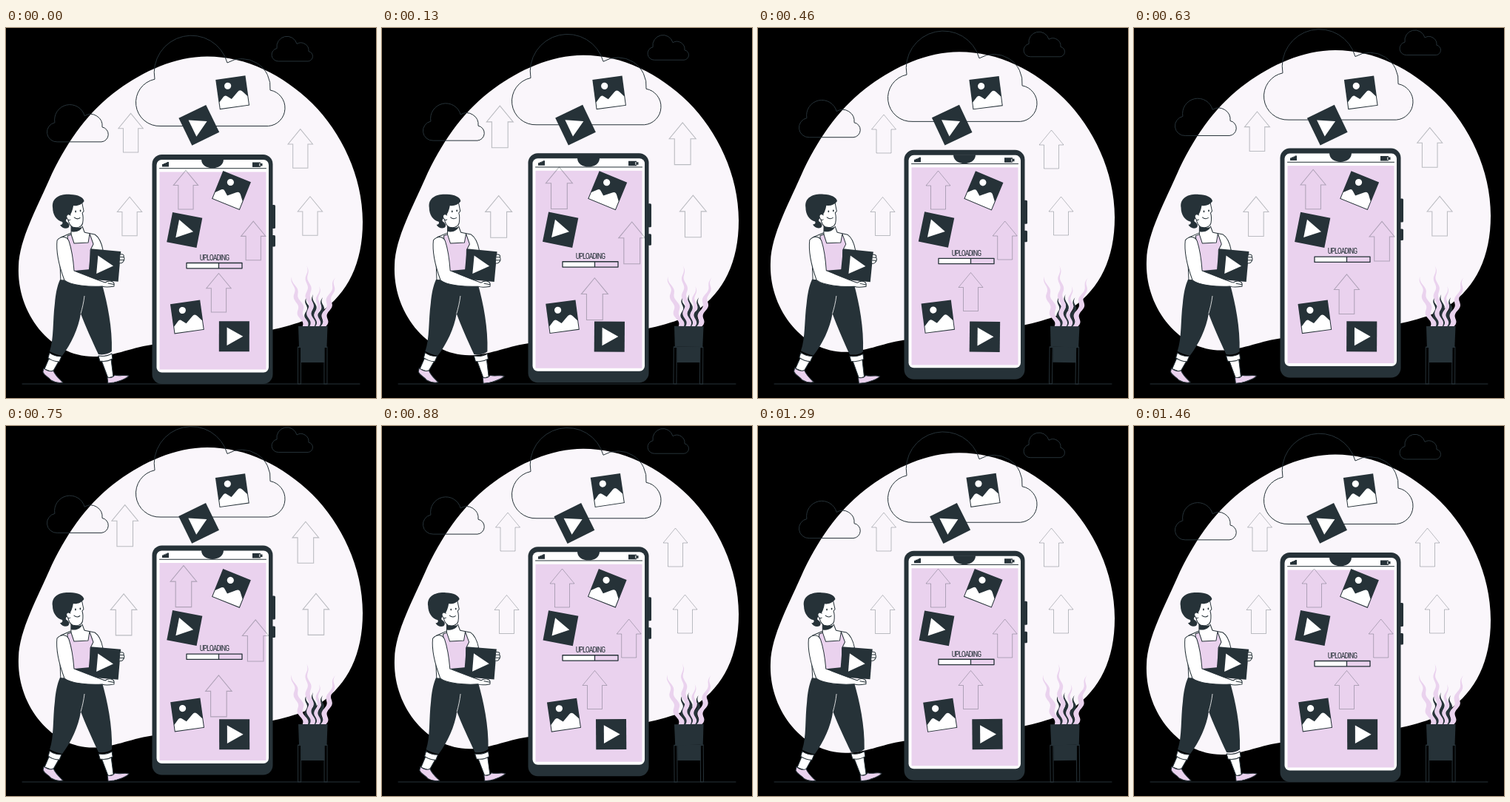
These frames come from a looping animation (500 by 500 pixels, 1500 ms). An HTML page:

```html
<!DOCTYPE html>
<html lang="en">
<head>
<meta charset="utf-8">
<title>Uploading</title>
<style>
  html, body { margin: 0; width: 100%; height: 100%; overflow: hidden; background: #000; }
  svg { display: block; width: 100%; height: 100%; }
  .k { fill: #263238; }
  .w { fill: #fff; }
  .l { fill: #ead2ee; }
  .o { stroke: #263238; stroke-width: 1; stroke-linejoin: round; stroke-linecap: round; }
  .n { fill: none; }
  .cloud { fill: none; stroke: #263238; vector-effect: non-scaling-stroke; }
  #arrows { fill: none; stroke: #263238; stroke-opacity: .3; }
  text {
    font: 10px "Roboto Condensed", "Open Sans Condensed", Roboto, "Noto Sans", sans-serif;
    font-stretch: extra-condensed; letter-spacing: -.9px; text-anchor: middle;
  }
</style>
</head>
<body>
<svg viewBox="0 0 500 500">
  <defs>
    <path id="cloud" class="cloud" d="M209 132.5A32 32 0 0 1 201 69.2A50.3 50.3 0 0 1 299 47A38.5 38.5 0 0 1 357 84A24.5 24.5 0 0 1 354.5 132.5Z"/>
    <path id="arrow" d="M0 0L16.5 20H10V52H-10V20H-16.5Z"/>
    <g id="play">
      <rect class="k" x="-20.5" y="-20.5" width="41" height="41"/>
      <path class="w" d="M-9.8 -12.3L12 0L-9.8 12.3Z"/>
    </g>
    <g id="photo">
      <rect class="k" x="-20.3" y="-20.3" width="40.6" height="40.6"/>
      <circle class="w" cx="-5.2" cy="-9.8" r="4.6"/>
      <path class="w" d="M-19.3 10.5L-13 4Q-10.5 1.5 -8 4L-2.5 8.5L7 0Q10.5 -3.5 14 1L19.3 7.5V19.3H-19.3Z"/>
    </g>
  </defs>

  <path class="o n" d="M22 481H478"/>

  <g id="float">
    <path fill="#faf6fb" d="M17 322C18 285 42 243 62 197C85 150 112 112 152 83C185 59 228 38.5 272 38.5C325 38.5 374 63 414 102C453 141 482 200 482 262C482 318 462 358 425 384C382 413 280 420 197 428C165 433 145 444 118 444C60 444 14 385 17 322Z"/>
    <use href="#cloud"/>
    <use href="#cloud" transform="translate(-16.7 99.4) scale(.411)"/>
    <use href="#cloud" transform="translate(310.8 8.5) scale(.275)"/>

    <rect class="k" x="359" y="239" width="5" height="32" rx="1.5"/>
    <rect class="k" x="359" y="280" width="5" height="15.5" rx="1.5"/>
    <rect class="k" x="197.5" y="171" width="163" height="310" rx="13"/>
    <rect class="w" x="203.5" y="178" width="151.5" height="287.5" rx="7"/>
    <rect class="l" x="207.5" y="194.5" width="144" height="267"/>
    <path class="o n" d="M207.5 189.7H351.5"/>
    <path class="k" d="M264 177.5C264 193.3 294 193.3 294 177.5Z"/>
    <path class="k" d="M211 187.5V184H213V183H215.5V182H217.5V181H220V187.5Z"/>
    <path class="k" d="M333 181.5H344V183H346.5V186.5H344V188H333Z"/>
    <path class="w" d="M342.3 182.8H343.3V186.8H342.3Z"/>
    <rect class="l" x="244" y="317.5" width="75" height="7.3"/>
    <rect class="w" x="244" y="317.5" width="43.5" height="7.3"/>
    <path class="o n" style="stroke-width: 1.3" d="M244 317.5H319V324.8H244ZM287.5 317.5V324.8"/>
    <text class="k" x="281.5" y="313.8">UPLOADING</text>
  </g>

  <g id="arrows"></g>
  <g id="tiles"></g>

  <g id="person">
    <path class="w o" d="M58 447L71 451L63 465L52 461Z"/>
    <path class="w o" d="M129 449L142 447L145 471L138 473Z"/>
    <path class="l o" d="M51 460C55 463 60 465 64 463C67 470 73 475 77 479C72 480 66 479 61 476C57 471 52 470 50 465Z"/>
    <path class="l o" d="M137 472C141 473 145 472 147 469C153 471 161 468 166 470C163 474 156 476 150 478L146 479L138 480Z"/>

    <path class="w o" d="M88 277L105 276L120 279C126 283 129 290 131 300L114 304L113 332L74 342L72 300L74 283Z"/>
    <path class="w" d="M88 262V279L92 290H110L106 276L102 266Z"/>
    <path class="l o" d="M83 281C84 300 87 315 92 329L114 330L114 300L118 292L113 278L111 290L92 291L88 279Z"/>
    <path class="o n" d="M88 264V279M103 268L106 276"/>
    <path class="k" d="M88 267C93 270 99 271 103 268.5C102 273 95 277 88 275Z"/>
    <path class="w o" d="M84 240C82 256 84 266 90 269C96 271 102 269 103.5 264C104.5 258 104 253 103 250L105 247.5C104 243 103 238 102 233Z"/>
    <path class="k" d="M63 243C61 229 74 224 87 225C97 225 105 229 105.5 234C102 239 96 241 91 240C90 246 88 252 84 256C81 258 80 261 82 262C85 264 87 267 84 270C80 272 75 270 73 266C76 266 77 264 76 262C68 260 63 252 63 243Z"/>
    <path class="w o" d="M87 253C83 250 80 254 83 258C84 260 86 260 87 259"/>
    <ellipse class="k" cx="94" cy="248" rx=".9" ry="1.4"/>
    <ellipse class="k" cx="100.5" cy="247" rx=".9" ry="1.4"/>
    <path class="o n" d="M92 256Q96 259.5 100 256.5"/>

    <path class="k" d="M73 340L130 347C137 372 144 405 143 437C138 441 131 442 125 441C117 424 107 402 101 386C98 406 88 427 76 443C70 442 64 440 59 437C65 420 63 395 66 372C67 360 69 349 73 340Z"/>
    <path class="n" stroke="#fff" stroke-width=".8" d="M106 362C105 371 103 379 101 386"/>
    <path class="w o" d="M59 439C64 443 70 444 75 444L72 451C67 451 61 449 57 446Z"/>
    <path class="w o" d="M125 443C131 444 138 443 143 440L144 447C139 450 132 451 127 450Z"/>

    <path class="k" d="M92 328L114 326V342Q103 334 92 328Z"/>
    <use href="#play" transform="translate(133 320.5) rotate(5)"/>
    <path class="w o" d="M69 287C74 281 82 281 85 288C89 300 91 315 92 328C105 333 122 340 134 344C138 341 144 341 146 345L146 349C140 350 135 351 130 349C112 350 88 348 79 341C73 325 67 305 69 287Z"/>
    <path class="o n" d="M138 345L146 346.5"/>
    <path class="w o" d="M154 306C158 305 160 307 159 309C160 311 160 314 158 316C157 318 154 318 153 317Z"/>
    <path class="o n" d="M154.5 309.5H159M154 313.5H159"/>
  </g>

  <g id="plant">
    <g id="leaves"></g>
    <path class="k" d="M395 403H434.5L433.5 431H396Z"/>
    <path class="k" d="M399 431H430.5V452H399Z"/>
    <path class="o n" d="M394.5 431H398.5V481H394.5ZM430 431H434V481H430ZM394.5 431.5H434"/>
  </g>
</svg>
<script>
const LOOP = 1500, LEAD = 20;
const $ = id => document.getElementById(id);

function add(parent, tag, attrs) {
  const el = document.createElementNS('http://www.w3.org/2000/svg', tag);
  for (const key in attrs) el.setAttribute(key, attrs[key]);
  $(parent).append(el);
}

function stamp(parent, shape, x, y, turn = 0) {
  add(parent, 'use', { href: '#' + shape, transform: `translate(${x} ${y}) rotate(${turn})` });
}

// Wavy blade with a pointed tip
function leaf(tone, x0, y0, x1, y1, width, waves) {
  const left = [], right = [], steps = 36;
  for (let i = 0; i <= steps; i++) {
    const s = i / steps;
    const half = width * Math.min(1, 2 * (1 - s));
    const x = x0 + (x1 - x0) * s + 2.4 * Math.sin(s * waves * 2 * Math.PI) * (1 - s * .4);
    const y = (y0 + (y1 - y0) * s).toFixed(1);
    left.push(`${(x - half).toFixed(1)} ${y}`);
    right.unshift(`${(x + half).toFixed(1)} ${y}`);
  }
  add('leaves', 'path', { class: tone, d: `M${left.concat(right).join('L')}Z` });
}

[[170, 117], [168.5, 228.5], [243.5, 193], [333.7, 261], [287.5, 330.5], [396.5, 138], [409.5, 228]]
  .forEach(([x, y]) => stamp('arrows', 'arrow', x, y));

[['photo', 306, 87.2, -8], ['play', 260.7, 131.3, -26], ['photo', 304.5, 219.5, 22],
 ['play', 241.3, 273, 11], ['photo', 245, 390.5, -8], ['play', 308.5, 416.8, 0]]
  .forEach(t => stamp('tiles', ...t));

[['k', 409, 404, 406, 364, 2.6, 2], ['k', 417, 404, 415, 360, 2.6, 2], ['k', 423.5, 404, 428, 364, 2.6, 2],
 ['l', 404, 404, 386, 336, 3.6, 3], ['l', 413, 404, 406, 321, 3.2, 3.5],
 ['l', 428, 404, 445, 337, 3.6, 3], ['l', 420, 404, 423, 349, 2.6, 2.5]]
  .forEach(b => leaf(...b));

// Linear keyframes as [phase, value] pairs
function track(p, keys) {
  const i = keys.findIndex(k => k[0] > p);
  const [a, u] = keys[i - 1], [b, v] = keys[i];
  return u + (v - u) * (p - a) / (b - a);
}

const LIFT = [[0, 0], [.5, -10], [1, 0]];
const SWAY = [[0, 0], [.25, 1], [.75, -1], [1, 0]];
const BEAT = [[0, 1], [.1, 1.09], [.3, 1], [.4, 1], [.5, 1.09], [.6, 1], [1, 1]];
const PIVOTS = { tiles: '274.5 251', person: '108.5 352.5', plant: '415.5 401' };

const move = (id, value) => $(id).setAttribute('transform', value);

function draw(ms) {
  const p = (ms + LEAD) % LOOP / LOOP;
  const sway = track(p, SWAY);
  move('float', `translate(0 ${track(p, LIFT) + .27})`);
  move('arrows', `translate(289 249.8) scale(${track(p, BEAT)}) translate(-289 -249.8)`);
  for (const id in PIVOTS) move(id, `rotate(${sway} ${PIVOTS[id]})`);
}

let start;
function tick(now) {
  start ??= now;
  draw(now - start);
  requestAnimationFrame(tick);
}
draw(0);
requestAnimationFrame(tick);
</script>
</body>
</html>
```
